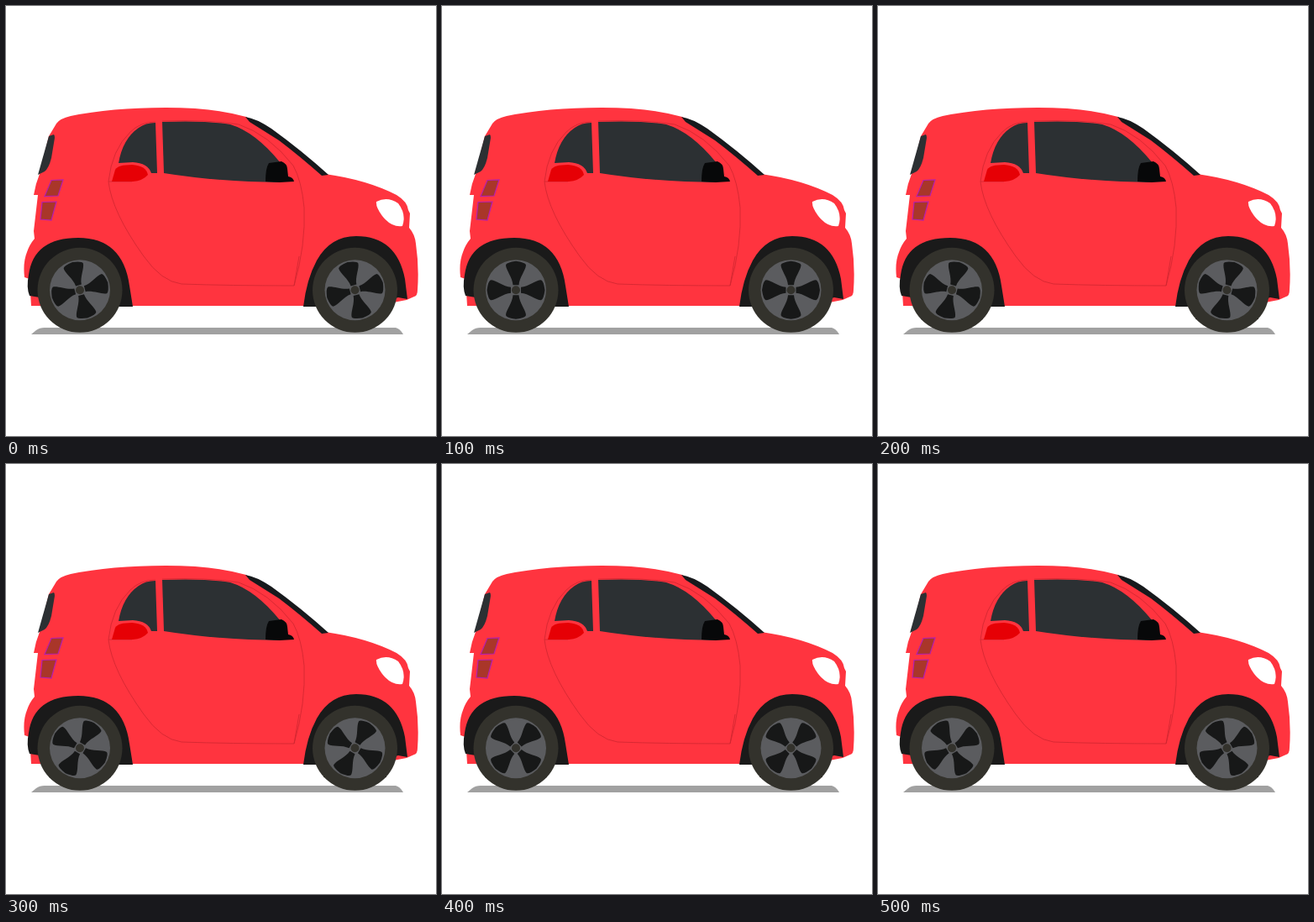
Write an HTML page that moves like this. It is 512 px wide and 512 px high and loops after 0.6 s.

```html
<!DOCTYPE html>
<html lang="en">
<head>
<meta charset="utf-8">
<title>Red car</title>
<style>
  html, body { margin: 0; height: 100%; overflow: hidden; background: #fff; }
  svg { display: block; width: 100vw; height: 100vh; }
</style>
</head>
<body>
<svg viewBox="0 0 512 512">
  <defs>
    <path id="blade" fill="#171818" d="M-3.5-6C-4-15-12-24-12-30Q-11-33 0-34.5Q11-33 12-30C12-24 4-15 3.5-6Z"/>
    <g id="spokes">
      <use href="#blade"/>
      <use href="#blade" transform="rotate(90)"/>
      <use href="#blade" transform="rotate(180)"/>
      <use href="#blade" transform="rotate(270)"/>
    </g>
    <g id="wheel">
      <circle r="50.5" fill="#33322c"/>
      <circle r="36" fill="#5b5c5f"/>
    </g>
  </defs>

  <path fill="#a1a1a1" d="M30 391L36 386Q40 383 46 383H464Q469 384 473 391Z"/>

  <!-- body -->
  <path fill="#ff343f" d="M60 140Q64 134 77 131Q125 121 190 121Q248 121 286 132Q334 160 380 200Q430 207 465 225Q478 233 479 243L481 247L480 264Q487 272 488 283Q492 310 490 338Q490 345 486 346L477 350L440 357H30L28 325L22 323Q20 305 25 293Q28 284 34 277L33 268L38 225H33Q35 212 40 200L51 155Z"/>

  <!-- wheel arches -->
  <g fill="#1a1a1a">
    <path d="M28 345Q24 335 27 320Q33 276 86 276Q139 276 147 333L151 358H120L40 347Z"/>
    <path d="M354 358Q358 325 370 303Q386 274 417 274Q465 274 475 325L478 349L467 347L430 358Z"/>
  </g>

  <!-- glass -->
  <g fill="#2c3033">
    <path d="M51 155L57 153Q58 154 58 157L54 181Q51 193 46 197L38 201Z"/>
    <path d="M134 187Q139 158 158 145Q166 139 178 139L180 199H173Q169 187 151 186Z"/>
    <path d="M186 138Q238 136 267 141Q297 150 327 187L326 210Q250 209 188 199Z"/>
  </g>
  <path fill="#17191c" d="M285 132Q298 134 316 146Q352 172 384 201L376 202Q350 179 325 160L290 138Z"/>

  <!-- door seams -->
  <g fill="none" stroke="#cf2630" stroke-width=".8">
    <path d="M178 138Q160 138 148 150Q126 171 122 209Q126 245 164 298Q185 328 209 331Q265 333 343 333Q357 285 355 240Q352 208 342 190Q313 153 277 141Q240 135 186 137"/>
    <path d="M122 209H150M343 333L349 298"/>
  </g>

  <path fill="#e60005" d="M126 209L130 195Q133 189 150 189Q167 190 169 201Q163 208 151 209Z"/>
  <path fill="#070809" d="M313 187L328 185Q335 188 335 194L336 203Q342 204 343 209L326 210L309 209Q309 193 313 187Z"/>

  <g fill="#a93629" stroke="#b41fae" stroke-width="1.2">
    <path d="M54 207.500L68 207L62 226L46 226.500Z"/>
    <path d="M43 233.500L60 233L54 255L41 254Z"/>
  </g>
  <path fill="#fff" d="M441 233Q454 226 467 235Q477 248 472 262Q459 264 448 250Q440 239 441 233Z"/>

  <g id="wheels"></g>
</svg>
<script>
const LOOP = 600, STEP = 100;
const wheels = document.getElementById("wheels");
wheels.innerHTML = [88, 415.5].map(x =>
  `<g transform="translate(${x} 338.300)">
    <use href="#wheel"/><use href="#spokes" class="spin"/>
    <circle r="5" fill="#33322c"/>
  </g>`).join("");
const spins = wheels.querySelectorAll(".spin");

// A quarter turn per loop, in steps of 15 degrees
function draw() {
  const step = Math.floor(performance.now() % LOOP / STEP);
  for (const spin of spins) spin.setAttribute("transform", `rotate(${15 * (step - 1)})`);
  requestAnimationFrame(draw);
}
draw();
</script>
</body>
</html>
```
